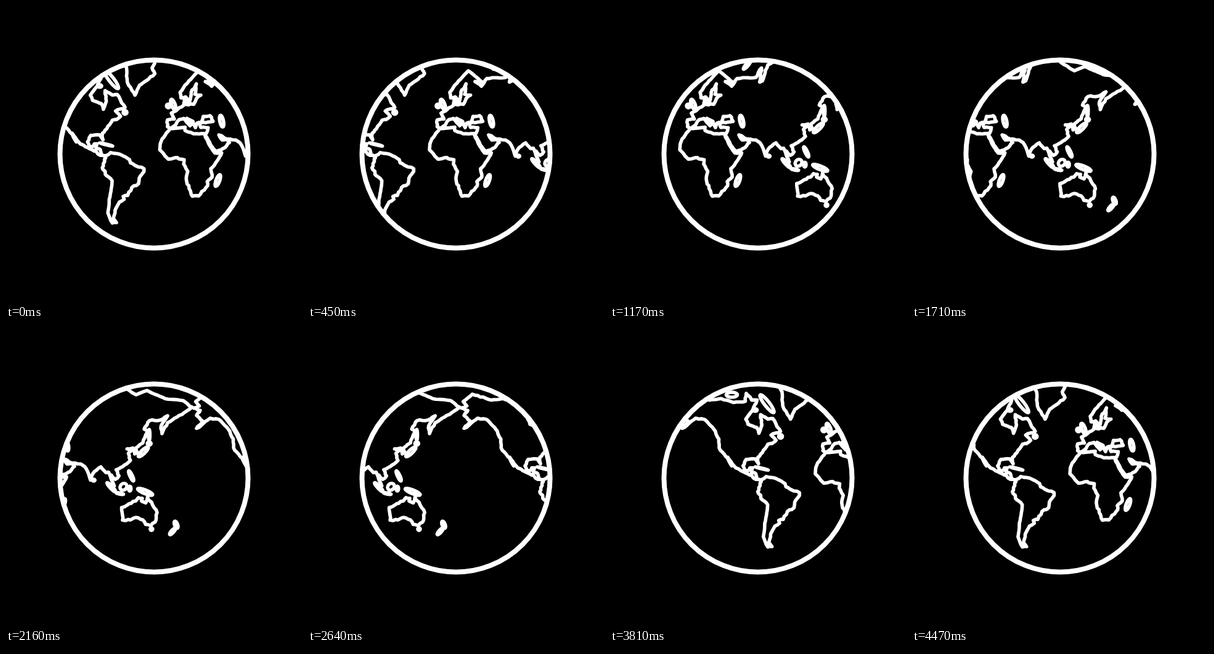
These frames come from a looping animation (480 px wide and 480 px high, 4.5 s). An HTML page with a canvas:

```html
<!DOCTYPE html>
<html lang="en">
<head>
<meta charset="utf-8">
<title>Turning globe</title>
<style>
html, body { margin: 0; width: 100%; height: 100%; overflow: hidden; background: #000; }
canvas { display: block; width: 480px; height: 480px; }
</style>
</head>
<body>
<canvas id="globe" width="480" height="480"></canvas>
<script>
const LOOP = 4500, STEP = 30, SPEED = 0.1164;  // ms, ms, px per ms
const WORLD = 527, SCALE = WORLD / 360;        // width of the whole map
const PRIME_X = 275, EQUATOR_Y = 255;
const PIECE = 5, ROUGHNESS = 0.9;              // px, coastline texture

// Key capes and bays as "lon,lat"; the coast between them is roughened by rule.
const coasts = {
  atlanticAmerica: `-168,65.6 -162,66.5 -166,68.4 -156,71.2 -135,69 -122,69.6 -108,68 -95,68.5
    -94,71.5 -88,69 -82,69 -87,64.5 -94.5,60 -92,57 -82.3,55 -80,51.2 -76.7,56.5 -78,62.4 -70,60
    -64.5,60.3 -56,52.5 -66.5,50 -61,46 -65.5,43.5 -70,43 -76,36 -81,31.5 -80.4,25.2 -84,30
    -94,29.5 -97.5,23 -95.5,18.5 -91,18.5 -90,21 -87,21 -88,16 -83.5,15 -82.5,9 -77,8.5`,
  pacificAmerica: `-168,65.6 -161,64.5 -165,62 -158,58.7 -165,54.5 -150,60.5 -140,59.8 -130,54
    -124.3,47 -124,40 -117,32.5 -110,23 -114.5,31.5 -105.5,21 -95,15.8 -88,13 -83.5,8.7 -78,8`,
  greenland: `-60,76 -54,71 -53.5,66.5 -45,60 -40,65 -23,70 -26,72 -20,76`,
  southAmerica: `-77,8.5 -72,11.8 -62,10 -51,4 -50,0.5 -44,-2.8 -35,-6 -35,-9 -39,-14 -41,-22
    -48.5,-26 -53,-33.5 -58,-34.5 -57,-37 -62.3,-39.5 -64.5,-42.5 -67,-46 -69,-52 -65.5,-54.8
    -70,-55 -75,-48 -73.5,-37 -70.3,-19 -76,-14 -81.2,-5 -80,-0.5 -77.5,6 -77,8.5`,
  africa: `-6,35.8 -13,27.7 -17,21 -17.5,14.7 -8,4.4 2,6.3 5,4.5 9.5,4 9,-1 13.5,-9 11.8,-17
    15,-27 18.5,-34.3 25.7,-34 35.5,-24 35,-20 40.5,-15 39,-6 46,2.5 51,11.5 43.5,11.3 37,20.5
    32.5,29.8 32,31.2 20,31 10.5,34 10.5,37 -6,35.8`,
  europe: `33,66.7 41,66.5 25.5,71 13,66 5,61.5 6,58.5 11,59 15,55.6 17.3,61.5 23,65.7 21.5,60.5
    28,60 23,58 20,54.5 11,54.5 10,57.5 8.8,53.8 2,51 -4.7,48.4 -1.5,44 -9,43.2 -9,37.5 -5.5,36
    0,39 4,43.4 9,44.4 16,38.3 18,40.3 12.5,44.5 19.3,42 22,36.7 23.5,40.5 28.5,41.2 30.7,46
    38,46.5 41.5,42 27,40.5 28,36.8 36,36.6 34,31.3`,
  southAsia: `32.6,29.8 42.7,15 45,12.9 55,17.2 59.7,22.5 56,25.5 51.5,25 48,29.9 57,25.8 66.7,25
    72.8,20 77.5,8 80.2,15 89,22 94.5,16 97.5,16.5 103.8,1.5 100,10 100.5,13.4 105,8.7 109,12.5
    106,19`,
  eastAsia: `106,19 113,22.2 121.7,28.5 119.5,35 122,37 118,39 124.5,39.8 126.5,34.6 129.3,36
    128,40 135.5,44 141,53 137,54 143,59.2 155,59.5 163,61.8 155.7,56 156.7,51 163,58 179,62.5
    190,66`,
  siberia: `190,66 180,68.8 160,69.6 140,72.5 128,71 113,73.8 102,77 80,73 74,67 71,66.5 73,72
    67,68.5 46,68 40,64.6 33,66.7`,
  australia: `112,-22 113.5,-32 113,-34.2 121.5,-34 128,-31.7 135.5,-34 138.5,-38 144.3,-39 149,-36
    151.3,-27 147,-20.5 143.3,-15 140.6,-10.8 138.7,-17 134,-15 134.8,-12.2 130.5,-11.5 127.6,-15
    120.2,-18 112,-22`
};

const land = new Path2D();

// Mercator projection
const project = (lon, lat) => [
  PRIME_X + lon * SCALE,
  EQUATOR_Y - Math.log(Math.tan(Math.PI / 4 + lat * Math.PI / 360)) * WORLD / (2 * Math.PI)
];

let seed = 7;
const jitter = () => {
  seed = seed * 16807 % 2147483647;
  return (seed / 2147483647 * 2 - 1) * ROUGHNESS;
};

function coast(line) {
  const points = line.split(/\s+/).map(p => project(...p.split(',').map(Number)));
  land.moveTo(...points[0]);
  for (let i = 1; i < points.length; i++) {
    const [ax, ay] = points[i - 1], [bx, by] = points[i];
    const pieces = Math.ceil(Math.hypot(bx - ax, by - ay) / PIECE);
    for (let k = 1; k < pieces; k++) {
      const f = k / pieces;
      land.lineTo(ax + (bx - ax) * f + jitter(), ay + (by - ay) * f + jitter());
    }
    land.lineTo(bx, by);
  }
}

// An island or lake: an ellipse with radii in px, tilted in degrees.
function island(lon, lat, rx, ry, tilt = 0) {
  const [x, y] = project(lon, lat), turn = tilt * Math.PI / 180;
  land.moveTo(x + rx * Math.cos(turn), y + rx * Math.sin(turn));
  land.ellipse(x, y, rx, ry, turn, 0, 2 * Math.PI);
}

Object.values(coasts).forEach(coast);

island(-71, 67.5, 18, 4, 52);     // Baffin
island(-110, 71, 9, 4);           // Victoria
island(-84, 64.7, 3, 2);          // Southampton
island(-56, 49, 3, 3);            // Newfoundland
island(-77, 20.4, 11, 0.5, 14);   // Antilles
island(-2.5, 54.3, 9, 3, 70);     // Britain
island(-8, 53.5, 3, 3);           // Ireland
island(51, 42.2, 9.5, 3, 78);     // Caspian Sea
island(46.8, -18.8, 10, 3, -70);  // Madagascar
island(57, 73, 9, 2, -50);        // Novaya Zemlya
island(81, 7.8, 2, 1.5);          // Ceylon
island(100.5, 0, 10, 2, 47);      // Sumatra
island(110, -7, 6, 1, 10);        // Java
island(114, 0.5, 6, 5, -45);      // Borneo
island(121, -1.5, 2, 4);          // Sulawesi
island(122.5, 12.5, 9, 2, 65);    // Philippines
island(136, 36.5, 11, 3, -44);    // Honshu
island(142.5, 43.5, 3, 2.5);      // Hokkaido
island(142.5, 50, 9, 1.2, 90);    // Sakhalin
island(138, -5, 13, 3, 22);       // New Guinea
island(145, -42, 2, 2);           // Tasmania
island(172.3, -38.3, 6, 2.5, 70); // New Zealand
island(168.5, -43.8, 7, 2, -48);

const disc = r => {
  const path = new Path2D();
  path.arc(240, 240, r, 0, 2 * Math.PI);
  return path;
};
const ring = disc(152.5), mask = disc(156);

const ctx = document.getElementById('globe').getContext('2d');
ctx.strokeStyle = '#fff';
ctx.lineJoin = ctx.lineCap = 'round';

function draw(time) {
  const shift = Math.floor((time % LOOP) / STEP) * STEP * SPEED;
  ctx.fillStyle = '#000';
  ctx.fillRect(0, 0, 480, 480);

  ctx.save();
  ctx.clip(mask);
  ctx.lineWidth = 5.6;
  for (const copy of [0, 1]) {
    ctx.save();
    ctx.translate(copy * WORLD - shift, 0);
    ctx.stroke(land);
    ctx.restore();
  }
  ctx.restore();

  ctx.lineWidth = 8;
  ctx.stroke(ring);
}

const start = performance.now();
function tick() {
  draw(performance.now() - start);
  requestAnimationFrame(tick);
}
tick();
</script>
</body>
</html>
```
